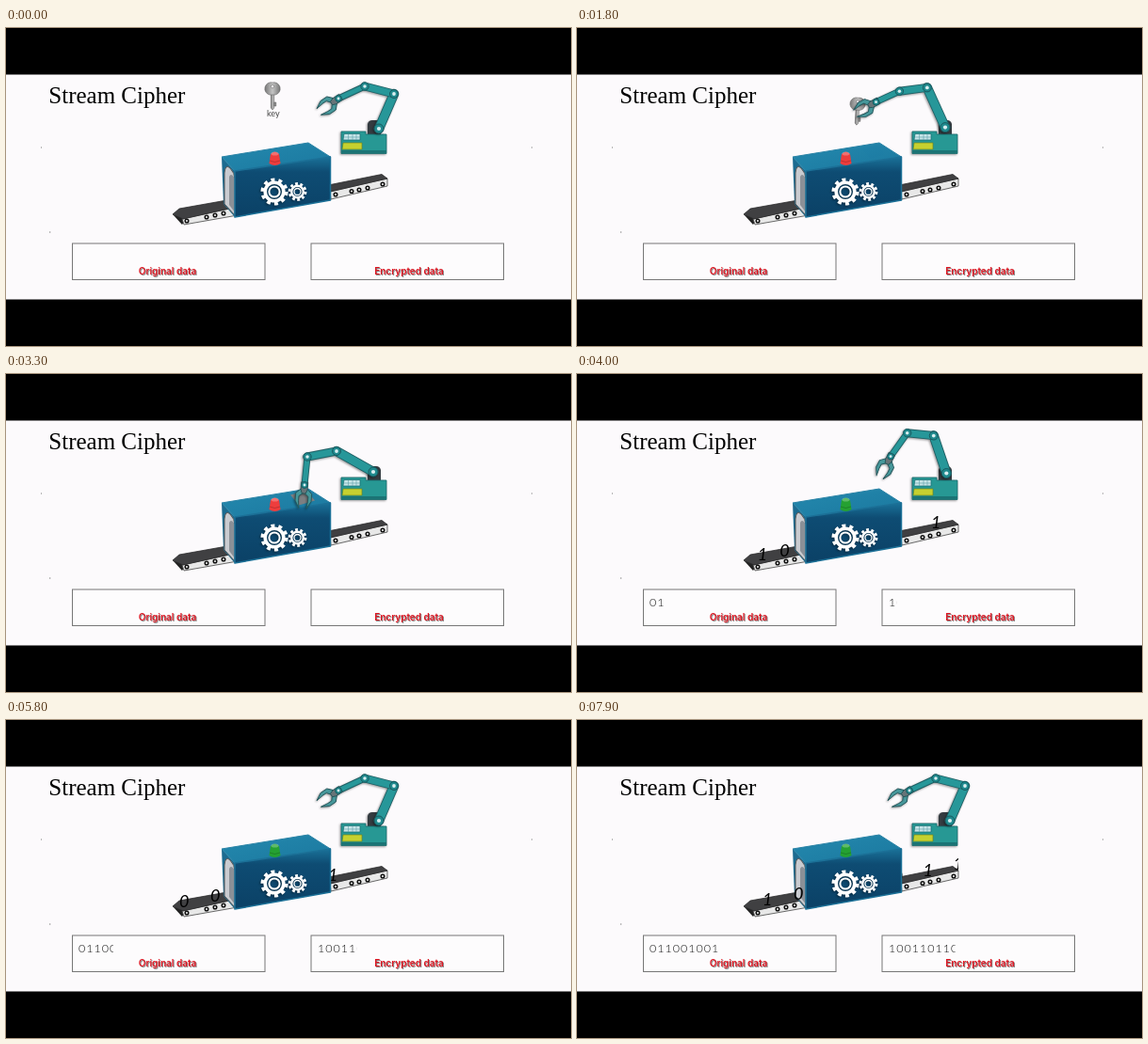
Animation of 600 by 338 pixels, one loop 8000 ms. Source, as an HTML page:

```html
<!DOCTYPE html>
<html lang="en">
<head>
<meta charset="utf-8">
<title>Stream Cipher</title>
<style>
  html, body { margin: 0; width: 100%; height: 100%; overflow: hidden; background: #000; }
  svg { display: block; width: 600px; height: 338px; }
  .title { font: 25px "Liberation Serif", serif; }
  .key { font: 9px Lato, sans-serif; fill: #444; }
  .label { font: 600 10px Inter, sans-serif; fill: #e01824; text-anchor: middle; filter: drop-shadow(1px 1px .7px #888); }
  .data { font: 300 12.5px Lato, sans-serif; letter-spacing: 1px; fill: #111; }
  .bit { font: italic 18px Lato, sans-serif; text-anchor: middle; }
  .shadow { filter: drop-shadow(-1px 1.5px 1px #0006); }
  .limb { fill: none; stroke-linecap: round; }
</style>
</head>
<body>
<svg viewBox="0 0 600 338">
  <defs>
    <linearGradient id="front" x2="0" y2="1">
      <stop stop-color="#1a7299"/><stop offset=".25" stop-color="#0e4c73"/><stop offset="1" stop-color="#0b4166"/>
    </linearGradient>
    <linearGradient id="roof" x2="1" y2="1">
      <stop stop-color="#2489ae"/><stop offset="1" stop-color="#1b789f"/>
    </linearGradient>
    <linearGradient id="steel"><stop stop-color="#777"/><stop offset=".5" stop-color="#c4c4c4"/><stop offset="1" stop-color="#777"/></linearGradient>
    <clipPath id="inClip"><rect id="inWipe" x="77" y="232" height="18"/></clipPath>
    <clipPath id="outClip"><rect id="outWipe" x="331" y="232" height="18"/></clipPath>
    <clipPath id="beltClip"><rect x="176" y="130" width="229" height="90"/></clipPath>
    <clipPath id="slotClip"><rect x="260" y="50" width="90" height="77"/></clipPath>
  </defs>

  <rect width="600" height="338"/>
  <rect y="49.500" width="600" height="239" fill="#fcfafc"/>
  <path d="M46 217h1.3M37 127h1M558 127h1" stroke="#777"/>
  <text class="title" x="45.300" y="80">Stream Cipher</text>

  <g fill="#fdfcfd" stroke="#777">
    <rect x="70.500" y="229" width="204.500" height="38.500"/>
    <rect x="324" y="229" width="204.500" height="38.500"/>
  </g>
  <text class="label" x="171.500" y="262">Original data</text>
  <text class="label" x="428" y="262">Encrypted data</text>
  <text class="data" x="77" y="247" clip-path="url(#inClip)">011001001</text>
  <text class="data" x="331" y="247" clip-path="url(#outClip)">100110110</text>

  <!-- conveyor -->
  <path d="M177 198L187 209 191 203z" fill="#222"/>
  <path d="M187 203L246 190V199L189 209z M344 174L405 160V168L345 182z" fill="#e8e8e8" stroke="#444" stroke-width=".8"/>
  <path d="M177 198L184 192 246 181V190L188 203z M342 167L399 155.500 405 160 344 174z" fill="#404042" stroke="#2b2b2d" stroke-width=".8"/>
  <g id="rollers" fill="#eee" stroke="#111" stroke-width="1.5"></g>

  <path d="M229 137L243 152V201L231 187z" fill="#1c6b90"/>
  <path d="M232 187V154q1-10 6-5q5 5 5 12V199z" fill="#c9cbd0" stroke="#555"/>
  <path d="M237 188V158q2-5 6 2V196z" fill="#8b9097"/>
  <g id="bits" clip-path="url(#beltClip)"></g>

  <!-- machine -->
  <path d="M229 137L321 122 344.500 137 243 152z" fill="url(#roof)" stroke="#2a83a6" stroke-linejoin="round"/>
  <path d="M243 152L344.500 137V183L243 201z" fill="url(#front)" stroke="#1b7097" stroke-width="1.500" stroke-linejoin="round"/>
  <path id="slot" d="M302 128.500L319 124 328 134.500 311 139.500z" fill="#7d7f82"/>
  <g id="lamp">
    <path d="M279.500 144L281 134q4.500-5 9 0L291.500 144q-6 4-12 0z"/>
    <ellipse cx="285.500" cy="133.500" rx="4" ry="2" fill="#fff4"/>
    <path d="M280 141q5.500 3 11 0" fill="none" stroke="#0003"/>
  </g>
  <g class="shadow" fill="none" stroke="#fff">
    <circle cx="285" cy="174" r="9.800" stroke-width="3.600"/>
    <circle cx="285" cy="174" r="12.800" stroke-width="3.600" stroke-dasharray="4 4.042"/>
    <circle cx="285" cy="174" r="5.600" stroke-width="2"/>
    <circle cx="309.500" cy="174" r="6.300" stroke-width="2.400"/>
    <circle cx="309.500" cy="174" r="8.500" stroke-width="2.800" stroke-dasharray="2.800 2.541"/>
    <circle cx="309.500" cy="174" r="3.500" stroke-width="1.300"/>
  </g>

  <!-- key -->
  <text class="key" id="keyLabel" x="277" y="93.700">key</text>
  <g clip-path="url(#slotClip)">
    <g id="key" fill="url(#steel)" stroke="#666" stroke-width=".6">
      <path d="M-1.700 4H1.700V19L0 21 -1.700 19z M1.700 13h2v4h-2z"/>
      <path fill-rule="evenodd" d="M0-8A6.500 6.500 0 0 1 3 5H-3A6.500 6.500 0 0 1 0-8z M0-5.500a1.700 1.700 0 0 0 0 3.400a1.700 1.700 0 0 0 0-3.400z"/>
    </g>
  </g>

  <!-- robot arm -->
  <g class="shadow">
    <path d="M384 113V102q1-4 5-4h4q4 0 5 4V114z" fill="#343b40"/>
    <path d="M356 110H382V113H404V133.500H356z" fill="#279894" stroke="#1b6a6c" stroke-width=".8"/>
    <path d="M356 131.500H404" stroke="#1b7475" stroke-width="3"/>
    <path d="M359 112.500H376V119H358z" fill="#c6e5e8" stroke="#176a70" stroke-width=".7"/>
    <path d="M363.500 113V119M368 113V119M372 113V119M359 116H376" stroke="#5fa0a8" stroke-width=".6"/>
    <path d="M358 122H378V129H357z" fill="#c6d12f" stroke="#6d8420" stroke-width=".7"/>
  </g>
  <g class="shadow">
    <g id="limbs"></g>
    <g id="claw" fill="#46979a" stroke="#24565b" stroke-width=".9" stroke-linejoin="round">
      <path d="M3-2L9-8.500 17-8.500 25-4 17-5 12-5 8 0z"/>
      <path d="M3 2L9 8.500 17 8.500 25 4 17 5 12 5 8 0z"/>
      <path d="M-3-3.500H5L9-2V2L5 3.500H-3z" fill="#687478"/>
    </g>
    <g id="joints"></g>
  </g>
</svg>

<script>
const $ = id => document.getElementById(id);
const clamp = v => Math.max(0, Math.min(1, v));

function add(parent, tag, attrs) {
  const el = document.createElementNS('http://www.w3.org/2000/svg', tag);
  set(el, attrs);
  parent.append(el);
  return el;
}

function set(el, attrs) {
  for (const name in attrs) el.setAttribute(name, attrs[name]);
}

// keys: [time, ...values], with eased motion between them
function sample(keys, t) {
  let i = 0;
  while (i < keys.length - 2 && t >= keys[i + 1][0]) i++;
  const [a, b] = [keys[i], keys[i + 1]];
  const u = clamp((t - a[0]) / (b[0] - a[0]));
  const e = u * u * (3 - 2 * u);
  return a.slice(1).map((v, k) => v + (b[k + 1] - v) * e);
}

// shoulder, elbow, forearm joint, wrist, claw angle
const rest = [396, 107, 412, 70, 381, 62, 353, 75, 146];
const reach = [391, 106, 379, 63, 349, 70, 319, 71, 180];
const grip = [391, 106, 375, 63, 344, 70, 312, 70, 180];
const lower = [391, 105, 367, 64, 340, 63, 326, 92, 107];
const insert = [390, 104, 351, 82, 320, 88, 317, 118, 95];
const armKeys = [[0, ...rest], [1100, ...reach], [1350, ...grip], [2400, ...lower],
  [2950, ...insert], [3400, ...insert], [3800, ...lower], [4400, ...rest]];
const keyKeys = [[0, 283, 66, 0], [1350, 283, 66, 0], [2400, 321, 107, 8], [2950, 317, 138, 0]];

const inStart = [3400, 3800, 4260, 5170, 5730, 6170, 6610, 7050, 7610];
const outStart = [3650, 4150, 4610, 5130, 5590, 6150, 6700, 7250, 7800];
const advance = 8.25;

const makeBits = s => [...s].map(d => {
  const el = add($('bits'), 'text', { class: 'bit' });
  el.textContent = d;
  return el;
});
const inBits = makeBits('011001001');
const outBits = makeBits('100110110');

const limbs = [10.5, 9, 7].map(w => ['#1d5f64', '#279799'].map((stroke, i) =>
  add($('limbs'), 'line', { class: 'limb', stroke, 'stroke-width': w - i * 1.8 })));
const joints = [5, 4.5, 4.2, 3.4].map(r => {
  const g = add($('joints'), 'g', {});
  add(g, 'circle', { r, fill: '#1f898d', stroke: '#1a5a60' });
  add(g, 'circle', { r: r * .42, fill: '#d9eef0' });
  return g;
});

for (const [cx, cy] of [[192, 205], [213, 201], [222, 199], [231, 197],
  [350, 177], [367, 173.5], [375, 172], [384, 170], [400, 166]])
  add($('rollers'), 'circle', { cx, cy, r: 1.8 });

const wipe = (starts, t, length) =>
  starts.reduce((w, s) => w + advance * clamp((t - s) / length), 0);

function place(el, x, y, shown) {
  set(el, { x, y: y + 6.5, visibility: shown ? 'visible' : 'hidden' });
}

function drawArm(t) {
  const p = sample(armKeys, t);
  limbs.forEach((pair, i) => pair.forEach(line =>
    set(line, { x1: p[2 * i], y1: p[2 * i + 1], x2: p[2 * i + 2], y2: p[2 * i + 3] })));
  joints.forEach((g, i) => set(g, { transform: `translate(${p[2 * i]} ${p[2 * i + 1]})` }));
  set($('claw'), { transform: `translate(${p[6]} ${p[7]}) rotate(${p[8]})` });

  const [x, y, turn] = sample(keyKeys, t);
  set($('key'), { transform: `translate(${x} ${y}) rotate(${turn})`, visibility: t < 2950 ? 'visible' : 'hidden' });
  set($('keyLabel'), { opacity: 1 - clamp((t - 1350) / 200) });
  set($('slot'), { opacity: clamp((t - 1800) / 300) * (1 - clamp((t - 3400) / 300)) });
  set($('lamp'), { fill: t < 3400 ? '#ee3d3d' : '#25a132' });
}

function drawData(t) {
  set($('inWipe'), { width: wipe(inStart, t, 150) });
  set($('outWipe'), { width: wipe(outStart, t, 180) });
  inBits.forEach((el, i) => {
    const x = 185 + (t - inStart[i]) * .059;
    place(el, x, 193 - (x - 189) * .19, t >= inStart[i] && x < 256);
  });
  outBits.forEach((el, i) => {
    const age = t - outStart[i];
    const x = i < 4 ? 325 + age * .16 : 335 + age * .058; // the first few leave quickly
    place(el, x, 164 - (x - 351) * .22, age >= 0 && x < 412);
  });
}

function frame() {
  const t = performance.now() % 8000;
  drawArm(t);
  drawData(t);
  requestAnimationFrame(frame);
}
frame();
</script>
</body>
</html>
```
